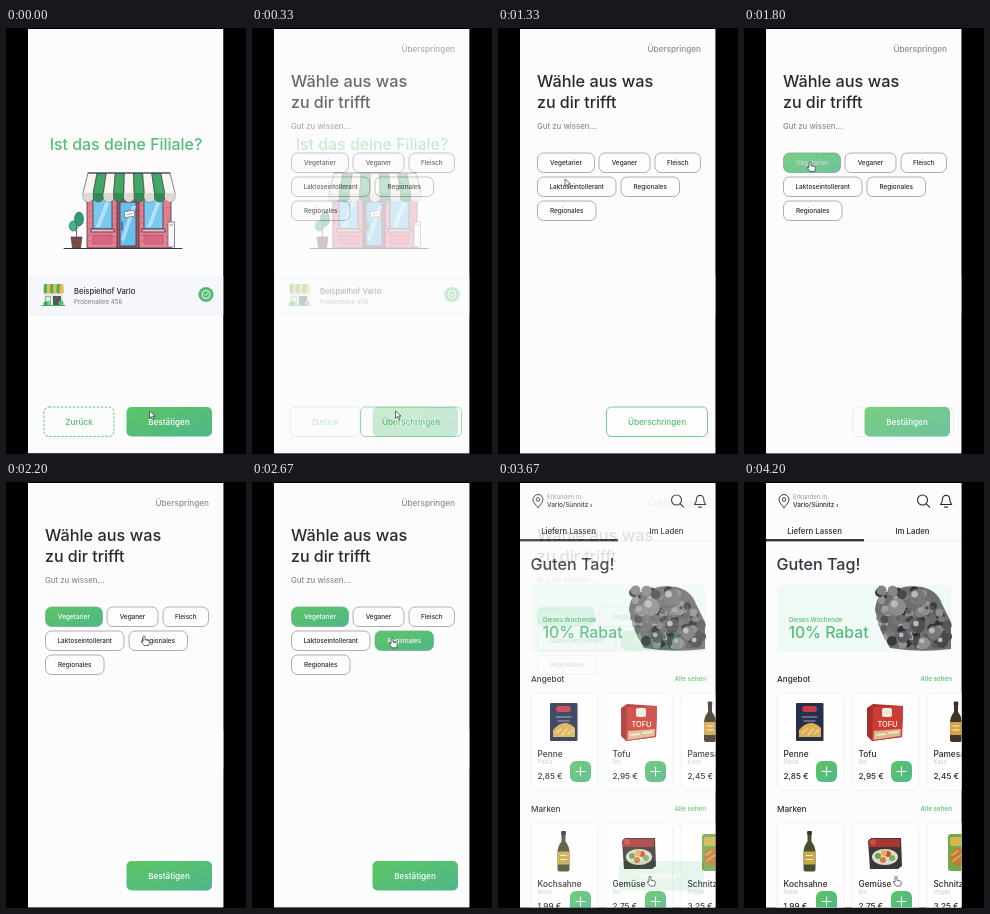
Animation of 240 by 426 pixels, one loop 4.27 s. Source, as an HTML page:

```html
<!DOCTYPE html>
<html lang="de">
<head>
<meta charset="utf-8">
<title>Einkaufs-App</title>
<style>
  html, body { margin: 0; width: 100%; height: 100%; overflow: hidden; background: #000; }
  svg { display: block; width: 100%; height: 100%; }
  text { font-family: Inter, "Open Sans", sans-serif; font-weight: 500; }
</style>
</head>
<body>
<svg id="stage" viewBox="0 0 240 426" xmlns="http://www.w3.org/2000/svg"></svg>
<script>
const LOOP = 4270, STEP = LOOP / 64;
const INK = '#29292d', GREY = '#8c8c91', GREEN = '#55bd72', GRAD = 'url(#green)';

// Markup helpers
const rect = (x, y, w, h, fill, r = 0, more = '') =>
  `<rect x="${x}" y="${y}" width="${w}" height="${h}" rx="${r}" fill="${fill}" ${more}/>`;
const circle = (x, y, r, fill, more = '') =>
  `<circle cx="${x}" cy="${y}" r="${r}" fill="${fill}" ${more}/>`;
const path = (d, fill, more = '') => `<path d="${d}" fill="${fill}" ${more}/>`;
const line = (d, color, w = 1) =>
  path(d, 'none', `stroke="${color}" stroke-width="${w}" stroke-linecap="round" stroke-linejoin="round"`);
const text = (s, x, y, size, fill = INK, weight = 500, anchor = 'start') =>
  `<text x="${x}" y="${y}" font-size="${size}" fill="${fill}" font-weight="${weight}" text-anchor="${anchor}">${s}</text>`;
const edge = (color, w = .7) => `stroke="${color}" stroke-width="${w}"`;
const group = (id, body) => `<g id="${id}">${body}</g>`;
const page = () => rect(22, 1, 195.5, 424.5, '#fcfcfd');

const confirmButton = () =>
  rect(120.5, 379, 85.5, 29.5, GRAD, 5) +
  text('Bestätigen', 163, 397, 8.2, '#fff', 600, 'middle');

function shop() {
  const dark = edge('#3b3545', .8);
  let s = rect(81, 160, 84, 60, '#e67f92', 0, dark);
  for (let y = 177; y < 218; y += 6)
    s += line(`M82 ${y}h3M107 ${y + 2}h3M134 ${y}h3M160 ${y + 2}h3`, '#c95f78', .8);
  for (const [x, w] of [[87, 19], [138, 19]]) {
    s += rect(x, 170, w, 31, '#79c8ee', 0, dark);
    s += path(`M${x + 3} 199L${x + 13} 173h4L${x + 7} 199z`, '#b4e4f8');
    s += rect(x - 2, 201, w + 4, 3, '#f4b5bd', 0, dark);
    s += rect(x, 207, w, 9, '#d76680', 0, edge('#b14f6b', .6));
  }
  s += rect(111, 170, 22, 50, '#a85567', 0, dark);
  s += rect(114, 174, 16, 44, '#69bfe8', 0, dark);
  s += path('M115 211L126 178h4L118 214z', '#a5def6');
  s += line('M116 194v8', '#3b3545', 1);
  s += rect(118.5, 183, 10, 6, '#fff', 1, 'stroke="#3b3545" stroke-width=".5" transform="rotate(-10 123 186)"');
  s += line('M121 186.5l5-1', '#77737d', .7);
  // Awning: tapered stripes with rounded ends
  for (let i = 0; i < 9; i++) {
    const a = 82 + i * 82 / 9, b = a + 82 / 9, c = 77 + i * 92 / 9, d = c + 92 / 9;
    s += path(`M${a} 145H${b}L${d} 165v4a${46 / 9} 5 0 0 1 ${-92 / 9} 0v-4z`,
      i % 2 ? '#42a765' : '#f7f5ef', edge('#3b3545', .6));
    s += path(`M${c} 165H${d}v4a${46 / 9} 5 0 0 1 ${-92 / 9} 0z`, i % 2 ? '#2f8b52' : '#dcd9d5');
  }
  s += line('M82 145H164', '#3b3545', 1);
  // Plant and board
  s += line('M70.5 210V190M70.5 204l-4-4M70.5 201l4-5', '#4d4750', .8);
  s += `<ellipse cx="73" cy="191" rx="4.5" ry="7" fill="#2f9b73" ${edge('#235f55', .6)}/>`;
  s += `<ellipse cx="67" cy="198" rx="3.8" ry="5" fill="#43b485" ${edge('#235f55', .6)}/>`;
  s += path('M65 209h11l-1.5 11h-8z', '#7c4b45', edge('#3b3545', .6));
  s += rect(162, 194, 6.5, 25, '#f7f7f9', 0, edge('#5b5861', .7));
  s += line('M164 197h2.5', '#8b6870', .8);
  return s + line('M58 220.5H176', '#3b3545', 1);
}

function stall() {
  let s = rect(38, 264, 19, 13, '#e9e6df') + rect(39, 268, 6, 9, '#7ac98c') +
    rect(47, 268, 8, 9, '#4f5a5c') + rect(40, 269, 4, 4, '#d6efe0');
  for (let i = 0; i < 6; i++)
    s += path(`M${38 + i * 3.2} 256h3.2l.7 7a2 2.4 0 0 1-4.4 0z`, i % 2 ? '#f1b84f' : '#48b065');
  return s + line('M36 277.5H59', '#4aa965', 1.2) + circle(55, 275, 2.5, '#59b970') + circle(39.5, 275.5, 2, '#3f9d5b');
}

const branch = () => page() +
  text('Ist das deine Filiale?', 120, 122, 15.9, GRAD, 600, 'middle') +
  shop() +
  rect(22, 248, 195.5, 38.5, '#f5f7fd') +
  line('M22.5 248.2H217M22.5 286.5H217', '#e9ecf5', .6) +
  stall() +
  text('Beispielhof Varlo', 68, 265.5, 7.6, INK, 600) +
  text('Probenallee 456', 68, 276, 6.2, GREY, 400) +
  circle(200, 266.5, 7.6, GREEN) +
  circle(200, 266.5, 4, 'none', edge('#fff', 1)) + line('M198.4 266.5l1.2 1.2 2.2-2.4', '#fff', .9) +
  rect(38, 379, 70, 29.5, 'none', 5, `${edge(GREEN, .9)} stroke-dasharray="2.4 1.6"`) +
  text('Zurück', 73, 397, 8.2, GREEN, 500, 'middle') +
  confirmButton();

function chip(label, x, y, w, on) {
  return rect(x, y, w, 19.5, on ? GRAD : '#fdfdfe', 6, on ? '' : edge('#8d8d92')) +
    text(label, x + w / 2, y + 12, 6.4, on ? '#fff' : INK, 500, 'middle');
}

const first = ['Vegetarier', 39.5, 125, 57], second = ['Regionales', 123, 149, 58.5];

const choice = () => page() +
  text('Überspringen', 203, 23.5, 8.2, GREY, 500, 'end') +
  text('Wähle aus was', 39, 59, 16.3, INK, 600) +
  text('zu dir trifft', 39, 80, 16, INK, 600) +
  text('Gut zu wissen...', 39, 101, 7.8, GREY) +
  [first, ['Veganer', 101, 125, 51], ['Fleisch', 157, 125, 45.5],
   ['Laktoseintollerant', 39.5, 149, 78.5], second, ['Regionales', 39.5, 173, 58.5]]
    .map(c => chip(...c)).join('') +
  group('skip', rect(108.5, 379, 101, 29.5, '#fdfdfe', 5, edge(GREEN, .8)) +
    text('Überschringen', 159, 397, 8.2, GREEN, 600, 'middle')) +
  group('picked1', chip(...first, true) + confirmButton()) +
  group('picked2', chip(...second, true));

// Grey heap of vegetables
function harvest() {
  let seed = 11, s = path('M131 128Q133 108 148 110Q160 102 178 105Q193 108 198 122L207 140V167Q176 171 146 166L137 149Z', '#6e6e70');
  const rnd = () => (seed = seed * 16807 % 2147483647) / 2147483647;
  for (let i = 0; i < 130; i++) {
    const v = rnd(), y = 108 + v * 55;
    const left = 133 + Math.max(0, v - .35) * 17, right = 180 + Math.min(1, v * 1.6) * 25;
    const x = left + rnd() * (right - left), r = 1.5 + rnd() * 3.6, g = Math.round(45 + rnd() * 130);
    s += circle(x.toFixed(1), y.toFixed(1), r.toFixed(1), `rgb(${g},${g},${g + 3})`);
  }
  for (const [x, y, r, g] of [[153, 125, 9, '#8d8d8f'], [173, 115, 8, '#777779'], [174, 144, 7, '#505053'],
      [190, 151, 7, '#77777a'], [159, 155, 6, '#5b5b5f'], [198, 160, 6, '#47474b'], [180, 161, 6, '#8f8f92']])
    s += circle(x, y, r, g) + circle(x - r * .3, y - r * .35, r * .4, '#b9b9bb');
  return s;
}

const pasta = () => rect(52, 221, 27.5, 38, '#25304f', 1) + rect(58, 224, 15, 6, '#c83b43', 3) +
  path('M55 248q11-13 22-2v9H55z', '#dcae55') + line('M58 251l5-4M64 253l5-6M70 252l5-4', '#f0d48a', 1.6) +
  line('M58 235h15M60 239h11', '#aab1c4', .9);

const tofu = () => path('M123 226l6-4 30 2-1 31-30 4-5-5z', '#a92e2b') + path('M129 225l30-1-1 31-30 4z', '#cb3d35') +
  rect(138, 226, 10, 9, '#eee8df', 2) + text('TOFU', 143.5, 245, 7.4, '#fff', 700, 'middle') +
  path('M130 249l27-2-.5 7-27 4z', '#d9b990') + line('M133 253l8-1M145 251l9-1', '#f5e4c9', 1.8);

const bottle = (x, y, body, label) =>
  path(`M${x - 2} ${y}h4v10q4 5 4 11v17q0 2-2 2h-8q-2 0-2-2v-17q0-6 4-11z`, body) +
  rect(x - 2.3, y - .5, 4.6, 4, '#343437', 1) + rect(x - 6, y + 20, 12, 13, label, 1) +
  line(`M${x - 3} ${y + 24}h6M${x - 3} ${y + 28}h6`, '#f8efd9', 1);

const meal = () => path('M124 359l3-3h30l1 28-4 3h-28z', '#3c3836') + rect(125, 357, 31, 8, '#a93632') +
  circle(129, 360, 3, '#d64842') + `<ellipse cx="141" cy="375" rx="13" ry="8" fill="#dedbd2"/>` +
  [[134, 374, '#6fa34b'], [139, 378, '#d57a33'], [144, 372, '#cf4c35'], [148, 376, '#7bb153'], [140, 371, '#e4b04e']]
    .map(([x, y, c]) => circle(x, y, 3, c)).join('');

const schnitzel = () => rect(204, 352, 20, 37, '#70a94d', 3) + rect(206, 355, 16, 9, '#d3b64c', 2) +
  `<ellipse cx="214" cy="375" rx="8" ry="9" fill="#c17a35"/>` + line('M208 373l6-4M209 379l8-6', '#e2a85a', 1.6);

function card(x, y, name, kind, price, picture) {
  return rect(x, y, 66.5, 97, '#fefefe', 5, edge('#e9f2f0', .8)) + picture +
    text(name, x + 6.5, y + 63.5, 8.3, INK, 600) +
    text(kind, x + 6.5, y + 70.5, 5.6, '#d0d1d5', 400) +
    text(price, x + 6.5, y + 85.5, 8.2, INK, 600) +
    rect(x + 39, y + 68, 21, 21, GRAD, 6) +
    line(`M${x + 45} ${y + 78.5}h9m-4.5-4.5v9`, '#fff', 1.1);
}

const home = () => page() +
  line('M40 25.5q-5-5-5-8a5 5 0 0 1 10 0q0 3-5 8z', INK, .9) + circle(40, 17.5, 1.8, 'none', edge(INK, .9)) +
  text('Erkunden in:', 49, 16.5, 6, '#a5a5aa', 400) +
  text('Varlo/Sünnitz ›', 49, 25, 6.4) +
  circle(178.5, 18, 5, 'none', edge(INK, 1.1)) + line('M182.3 21.8l3.4 3.4', INK, 1.1) +
  line('M196.5 22.5q2-2 2-5.5a3.6 3.6 0 0 1 7.2 0q0 3.500 2 5.500zM200.500 24.800q1.600 1.300 3.200 0', INK, 1.1) +
  text('Liefern Lassen', 70.5, 52, 7.8, INK, 600, 'middle') +
  text('Im Laden', 168.5, 52, 7.8, INK, 600, 'middle') +
  rect(22, 58.6, 195.5, .7, '#e9e9ee') + rect(22, 57, 98, 2.4, '#38343d') +
  text('Guten Tag!', 32.5, 88, 16.1, '#37343d', 600) +
  rect(33, 103, 174.5, 67, '#effaf6', 4) + harvest() +
  text('Dieses Wochende', 45, 140, 6.2, GREEN) +
  text('10% Rabat', 44.5, 156, 15.8, GRAD, 600) +
  text('Angebot', 33, 200, 8.2, INK, 600) + text('Alle sehen', 208, 199, 6.3, GREEN, 500, 'end') +
  card(33, 211, 'Penne', 'Pasta', '2,85 €', pasta()) +
  card(108, 211, 'Tofu', 'Bio', '2,95 €', tofu()) +
  card(183, 211, 'Pamesan', 'Käse', '2,45 €', bottle(212, 220, '#3f3428', '#d3a344')) +
  text('Marken', 33, 329.5, 8.2, INK, 600) + text('Alle sehen', 208, 328.5, 6.3, GREEN, 500, 'end') +
  card(33, 341, 'Kochsahne', 'Natur', '1,99 €', bottle(65.5, 349.5, '#4b4f32', '#c9a848')) +
  card(108, 341, 'Gemüse', 'Bio', '2,75 €', meal()) +
  card(183, 341, 'Schnitzel', 'Vegan', '3,25 €', schnitzel());

const stage = document.getElementById('stage');
stage.innerHTML = `<defs>
  <linearGradient id="green" x1="0" y1="0" x2="1" y2="1">
    <stop stop-color="#5cc564"/><stop offset="1" stop-color="#4fb78a"/>
  </linearGradient>
  <clipPath id="phone">${rect(22, 1, 195.5, 424.5, '#fff')}</clipPath></defs>
  ${rect(0, 0, 240, 426, '#000')}
  <g clip-path="url(#phone)">
    ${branch()}${group('choice', choice())}${group('home', home())}
    <g id="cursor">
      ${path('M0 0v7.2l1.800-1.600 1.400 2.900 1.300-.6-1.400-2.800h2.500z', '#fff', `id="arrow" ${edge('#34343a', .7)}`)}
      ${path('M-1 .8a1 1 0 0 1 2 0V3.800l3.400.7q1.100.4.900 1.700L4.600 9.500H.2L-2.600 6q-.4-1.200.8-1l.8.7z', '#fff', `id="hand" ${edge('#34343a', .7)}`)}
    </g>
  </g>`;

const part = Object.fromEntries(
  ['choice', 'home', 'skip', 'picked1', 'picked2', 'cursor', 'arrow', 'hand'].map(id => [id, document.getElementById(id)]));

// [time, x, y] of the pointer tip
const trail = [[0, 143.5, 383], [530, 143.5, 383], [730, 145, 374], [1330, 67, 151], [1530, 66, 134],
  [1800, 66, 134], [2200, 138, 154], [2650, 140, 155], [3080, 152, 394.5], [LOOP, 152, 394.5]];

const clamp = v => Math.max(0, Math.min(1, v));
const easeOut = v => 1 - (1 - v) ** 2;
const smooth = v => v * v * (3 - 2 * v);
const fade = (t, from, length = 300) => easeOut(clamp((t - from) / length));

function pointer(t) {
  const i = trail.findIndex((k, n) => n && t <= k[0]);
  const [t0, x0, y0] = trail[i - 1], [t1, x1, y1] = trail[i];
  const p = smooth((t - t0) / (t1 - t0));
  return [x0 + (x1 - x0) * p, y0 + (y1 - y0) * p];
}

function draw(t) {
  const picked = fade(t, 1630);
  part.choice.style.opacity = fade(t, 200);
  part.picked1.style.opacity = picked;
  part.skip.style.opacity = 1 - picked;
  part.picked2.style.opacity = fade(t, 2400);
  part.home.style.opacity = fade(t, 3460, 330);
  const [x, y] = pointer(t);
  part.cursor.setAttribute('transform', `translate(${x.toFixed(2)} ${y.toFixed(2)})`);
  const hand = t > 1450;
  part.hand.style.display = hand ? '' : 'none';
  part.arrow.style.display = hand ? 'none' : '';
}

const start = performance.now();
function tick() {
  const t = (performance.now() - start) % LOOP;
  draw(Math.min(63, Math.floor((t + 5) / STEP)) * STEP);
  requestAnimationFrame(tick);
}
tick();
</script>
</body>
</html>
```
